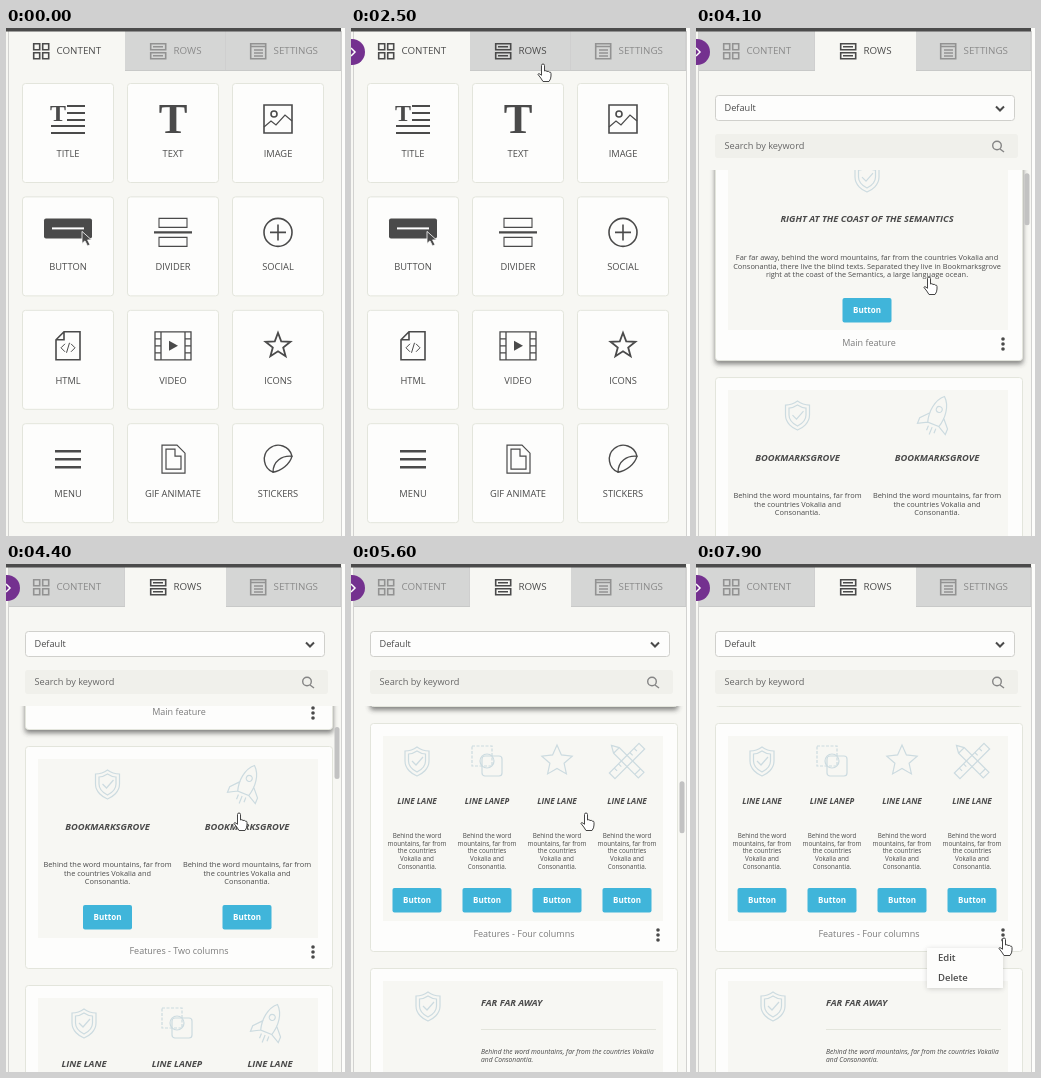
Write an HTML page that moves like this. It is 339 by 508 pixels and loops after 8000 ms.

```html
<!DOCTYPE html>
<html lang="en">
<head>
<meta charset="utf-8">
<title>Editor panel</title>
<style>
  html, body { margin: 0; width: 100%; height: 100%; overflow: hidden; background: #fdfdfb; }
  svg { display: block; width: 339px; height: 508px; font-family: "Open Sans", sans-serif; }
  .icon, .art { fill: none; stroke: #4a4a4a; stroke-width: 1.6; }
  .art { stroke: #ccdbe0; stroke-width: 1.2; }
  .serif { font: bold 24px "Liberation Serif", serif; fill: #4a4a4a; stroke: none; }
</style>
</head>
<body>
<svg id="stage" viewBox="0 0 339 508"></svg>
<script>
const LOOP = 8000, STEP = 100;
const INK = '#4a4a4a', PANEL = '#f7f7f3', CARD = '#fdfdfc', LINE = '#e3e5dc', TAB = '#d5d6d5', BLUE = '#40b5da';

const rect = (x, y, w, h, fill, extra = '') =>
  `<rect x="${x}" y="${y}" width="${w}" height="${h}" fill="${fill}" ${extra}/>`;
const path = (d, extra = '') => `<path d="${d}" ${extra}/>`;
const text = (x, y, str, size, extra = '', fill = INK) =>
  `<text x="${x}" y="${y + size * .36}" font-size="${size}" fill="${fill}" ${extra}>${str}</text>`;
const MID = 'text-anchor="middle"';
const group = (x, y, body, extra = '') => `<g transform="translate(${x} ${y})" ${extra}>${body}</g>`;
const box = (x, y, w, h) => `M${x} ${y}h${w}v${h}h${-w}z`;
const star = (outer, inner) => 'M' + Array.from({ length: 10 }, (_, i) => {
  const r = i % 2 ? inner : outer, a = i * Math.PI / 5;
  return `${(r * Math.sin(a)).toFixed(1)} ${(-r * Math.cos(a)).toFixed(1)}`;
}).join('L') + 'z';

// Content tab: icons are drawn around their centre
const tiles = [
  ['TITLE', '<text class="serif" x="-18" y="2">T</text>' +
    path('M-1-13H17M-1-6H17M-1 1H17M-17 7H17M-17 14H17', 'stroke-width="2"')],
  ['TEXT', `<text class="serif" style="font-size:43px" y="14" ${MID}>T</text>`],
  ['IMAGE', path(box(-14, -14, 28, 28)) + '<circle cx="-4" cy="-5" r="3"/>' +
    path('M-14 8L-7 2L-2 6L7-4L14 2', 'stroke-width="1.2"')],
  ['BUTTON', rect(-24, -14, 48, 20, INK, 'rx="2" stroke="none"') +
    path('M-16-4H16', 'stroke="#fff" stroke-width="2"') +
    path('M14-1V11L17 8.5L19.5 13.5L22 12.3L19.6 7.5H23.500z', `fill="${INK}" stroke="#fff" stroke-width=".8"`)],
  ['DIVIDER', path(box(-14, -14, 28, 9) + box(-14, 5, 28, 9), 'stroke-width="1.1"') +
    path('M-19 0H19', 'stroke-width="2.2"')],
  ['SOCIAL', '<circle r="14"/>' + path('M-8 0H8M0-8V8')],
  ['HTML', path('M-4-14H12V14H-12V-6zV-6H-12') +
    path('M-3-2L-7 2L-3 6M3-2L7 2L3 6M1.500-3L-1.500 7', 'stroke-width="1"')],
  ['VIDEO', path(box(-18, -14, 36, 28) + 'M-12-14V14M12-14V14M-18-7h6M-18 0h6M-18 7h6M12-7h6M12 0h6M12 7h6', 'stroke-width="1.3"') +
    path('M-4-5L5 0L-4 5z', `fill="${INK}" stroke="none"`)],
  ['ICONS', path(star(13, 5.5), 'stroke-width="1.8"')],
  ['MENU', path('M-13-8H13M-13 0H13M-13 8H13', 'stroke-width="2.6"')],
  ['GIF ANIMATE', path('M-11-14H4L12-6V14H-11z', 'stroke-width="1.2"') +
    path('M-7-10H2V-3H8V10H-7z', 'stroke-width="1.2"')],
  ['STICKERS', path('M-5 13A14 14 0 1 1 14-3C4-4-5 2-5 13C3 12 12 5 14-3', 'stroke-width="1.4"')],
];
const contentView = tiles.map(([name, icon], i) => {
  const x = 16.5 + i % 3 * 105, y = 55.5 + Math.floor(i / 3) * 113.4;
  return rect(x, y, 91, 99, CARD, `rx="3" stroke="${LINE}"`) +
    group(x + 45.5, y + 35.5, icon, 'class="icon"') +
    text(x + 45.5, y + 70, name, 9.3, MID);
}).join('');

// Rows tab
const art = {
  shield: path('M0-14C4-11 8-10 12-10V0C12 8 5 13 0 15C-5 13-12 8-12 0V-10C-8-10-4-11 0-14z') +
    path('M0-10C3-8 6-7 8.500-7V0C8.500 6 4 9 0 11C-4 9-8.500 6-8.500 0V-7C-6-7-3-8 0-10z') + path('M-5 0L-1 4L6-4'),
  shapes: path(box(-15, -15, 20, 20), 'stroke-dasharray="3 1.5"') +
    '<rect x="-5" y="-5" width="20" height="20" rx="3"/><circle r="7"/>',
  rocket: `<g transform="rotate(22)">${path('M0-20C8-13 9 0 6 10H-6C-9 0-8-13 0-20zM-7 0L-15 9V15L-6 10M7 0L15 9V15L6 10M-4 13V18M0 13V21M4 13V18')}<circle cy="-6" r="3"/></g>`,
  star: path(star(16, 7.5)),
  tools: `<g transform="rotate(45)">${path(box(-4, -21, 8, 42) + 'M-4-14h4M-4-8h4M-4 8h4M-4 14h4')}</g>` +
    `<g transform="rotate(-45)">${path('M-4-15L0-22L4-15V20H-4zM-4-15H4M-4 15H4')}</g>`,
};
const drawArt = (name, x, y) => group(x, y, art[name], 'class="art"');
const button = (x, y) => rect(x - 24.5, y, 49, 24.5, BLUE, 'rx="2"') +
  text(x, y + 12, 'Button', 8, `${MID} font-weight="700"`, '#fff');
const HEADING = 'font-weight="700" font-style="italic"';
const column = (x, spec, [icon, title]) =>
  drawArt(icon, x, 38) +
  text(x, spec.titleY, title, spec.titleSize || 9.3, `${MID} ${HEADING}`) +
  spec.lines.map((line, i) => text(x, spec.textY + i * spec.size * 1.2, line, spec.size, MID)).join('') +
  button(x, spec.buttonY);

const SHIELD = ['shield', 'LINE LANE'], SHAPES = ['shapes', 'LINE LANEP'];
const cards = [
  { top: 142, height: 222, label: 'Main feature', xs: [171], titleY: 80, textY: 118, size: 7.4, buttonY: 159,
    cols: [['shield', 'RIGHT AT THE COAST OF THE SEMANTICS']],
    lines: ['Far far away, behind the word mountains, far from the countries Vokalia and',
      'Consonantia, there live the blind texts. Separated they live in Bookmarksgrove',
      'right at the coast of the Semantics, a large language ocean.'] },
  { top: 380, height: 223, label: 'Features - Two columns', xs: [101.5, 241], titleY: 81, textY: 118, size: 7.4, buttonY: 159,
    cols: [['shield', 'BOOKMARKSGROVE'], ['rocket', 'BOOKMARKSGROVE']],
    lines: ['Behind the word mountains, far from', 'the countries Vokalia and', 'Consonantia.'] },
  { top: 619, height: 230, label: 'Features - Three columns', xs: [78, 171, 264], titleY: 79, textY: 116, size: 7.4, buttonY: 167,
    cols: [SHIELD, SHAPES, ['rocket', 'LINE LANE']],
    lines: ['Behind the word', 'mountains, far from the', 'countries Vokalia and', 'Consonantia.'] },
  { top: 865, height: 229, label: 'Features - Four columns', xs: [66, 136, 206, 276], titleY: 78, titleSize: 8.2, textY: 113, size: 6.3, buttonY: 165,
    cols: [SHIELD, SHAPES, ['star', 'LINE LANE'], ['tools', 'LINE LANE']],
    lines: ['Behind the word', 'mountains, far from', 'the countries', 'Vokalia and', 'Consonantia.'] },
  { top: 1110, height: 230, label: '', xs: [], cols: [] },
];
const articleBody = drawArt('shield', 77, 38) +
  text(130, 35, 'FAR FAR AWAY', 9.3, HEADING) + rect(130, 61, 175, 1, LINE) +
  ['Behind the word mountains, far from the countries Vokalia', 'and Consonantia.']
    .map((line, i) => text(130, 84 + i * 8, line, 6.7, 'font-style="italic"')).join('');

const cardView = card => group(0, card.top,
  rect(19, 3, 308, card.height, '#333', 'class="shadow" rx="3" filter="url(#blur)" opacity="0"') +
  rect(19.5, .5, 307, card.height - 1, CARD, `rx="3" stroke="${LINE}"`) +
  rect(32, 13, 280, card.height - 44, PANEL) +
  (card.xs.length ? card.xs.map((x, i) => column(x, card, card.cols[i])).join('') : articleBody) +
  text(173, card.height - 18, card.label, 9, MID, '#7b7b7b') +
  [-5, 0, 5].map(dy => `<circle cx="307" cy="${card.height - 17 + dy}" r="1.8" fill="${INK}"/>`).join(''));

const rowsView =
  `<g clip-path="url(#list)"><g id="scroller">${cards.map(cardView).join('')}</g></g>` +
  rect(19.5, 67.5, 299, 25, CARD, 'rx="3" stroke="#d0d0cc"') + text(28.5, 80, 'Default', 9.2) +
  path('M300 78.500L304 82.500L308 78.500', `fill="none" stroke="${INK}" stroke-width="2"`) +
  rect(19, 106, 303, 24, '#f0f0eb', 'rx="3"') + text(28.5, 118, 'Search by keyword', 9.2, '', '#666') +
  '<g fill="none" stroke="#858585" stroke-width="1.4"><circle cx="301" cy="117.500" r="4.300"/><path d="M304 121L308 124"/></g>' +
  rect(328.5, 142, 5, 52, '#c2c2c2', 'id="thumb" rx="2.5"');

// Tab strip
const tabs = [
  { x: 2, w: 117, label: 'CONTENT', icon: 27, d: box(.7, .7, 6, 6) + box(9.7, .7, 6, 6) + box(.7, 9.7, 6, 6) + box(9.7, 9.7, 6, 6) },
  { x: 119, w: 101, label: 'ROWS', icon: 144, d: box(.7, .7, 15, 6) + box(.7, 9.7, 15, 6) + 'M3 3.700H13M3 12.700H13' },
  { x: 220, w: 115, label: 'SETTINGS', icon: 244, d: box(.7, .7, 15, 15) + 'M1 3.500H15M4 7H13M4 10H13M4 13H13' },
];
const tabView = tab => `<g class="tab">` +
  rect(tab.x, 3, tab.w, 40, TAB) + path(`M${tab.x} 42.500h${tab.w}M${tab.x + tab.w} 3v40`, 'class="edge" stroke="#c8c9c8"') +
  group(tab.icon, 15, path(tab.d), 'class="icon"') +
  text(tab.icon + 23.5, 22.5, tab.label, 9.8) + '</g>';

const menuView = rect(231, 385, 76, 40, '#555', 'filter="url(#blur)" opacity=".25"') +
  rect(231, 384, 76, 40, CARD) +
  text(242, 394, 'Edit', 9.5, 'font-weight="600"') + text(242, 413.5, 'Delete', 9.5, 'font-weight="600"');

document.getElementById('stage').innerHTML =
  `<defs><filter id="blur" x="-10%" y="-20%" width="120%" height="140%"><feGaussianBlur stdDeviation="2.5"/></filter>
   <clipPath id="list"><rect x="2" y="142" width="333" height="366"/></clipPath></defs>` +
  rect(0, 0, 336, 508, PANEL) +
  `<g id="content">${contentView}</g><g id="rows">${rowsView}</g>` +
  tabs.map(tabView).join('') +
  path('M2.500 3V508M335.500 3V508', 'stroke="#d2d2d0"') + rect(0, 0, 335, 3.5, '#4b4b4b') +
  `<g id="opener"><circle cx="1" cy="24" r="13" fill="#74318f"/>${path('M0 20L4 24L0 28', 'fill="none" stroke="#fff" stroke-width="1.5"')}</g>` +
  `<g id="menu">${menuView}</g>` +
  `<g id="cursor">${path('M-1.500 1.500a1.500 1.500 0 0 1 3 0V7q1.500-1 2.500.5 1.500-.7 2.200.6 1.800-.4 1.800 1.400V12q0 3-2 5.500H0Q-2 14-5 10.500q.3-2 3.500.8z', 'fill="#fff" stroke="#444"')}</g>`;

// Motion
const $ = id => document.getElementById(id);
const clamp01 = v => Math.min(1, Math.max(0, v));
const smooth = v => v * v * (3 - 2 * v);
function track(keys, t) {
  const next = keys.findIndex(key => key[0] > t);
  if (next < 0) return keys[keys.length - 1].slice(1);
  if (next === 0) return keys[0].slice(1);
  const a = keys[next - 1], b = keys[next], p = smooth((t - a[0]) / (b[0] - a[0]));
  return a.slice(1).map((v, i) => v + (b[i + 1] - v) * p);
}
const scrollKeys = [[4000, 0], [4400, 198], [4700, 404], [5000, 404], [5600, 706]];
const cursorKeys = [[1000, 318, 300], [1800, 192, 36], [3200, 192, 36], [3600, 233, 249],
  [5200, 233, 249], [5600, 235, 249], [5900, 235, 249], [6600, 308, 374]];
const hoverTimes = { 0: [3500, 4400], 2: [4700, 5600], 3: [5700, 6900] };
const fade = (t, [start, end]) => clamp01((t - start) / 200) * (1 - clamp01((t - end) / 200));

const tabNodes = [...document.querySelectorAll('.tab')];
const shadowNodes = [...document.querySelectorAll('.shadow')];
const show = (id, on) => { $(id).style.display = on ? '' : 'none'; };

function draw(t) {
  const rowsOpen = t >= 2700, active = rowsOpen ? 1 : 0;
  show('content', !rowsOpen);
  show('rows', rowsOpen);
  show('opener', t >= 1000);
  show('cursor', t >= 1000);
  show('menu', t >= 7000);
  show('thumb', t >= 3600 && t < 7000);

  tabNodes.forEach((node, i) => {
    const dark = i === active || (i === 1 && t >= 1800);
    node.querySelector('rect').style.fill = i === active ? PANEL : TAB;
    node.querySelector('.edge').style.display = i === active ? 'none' : '';
    node.querySelector('.icon').style.stroke = dark ? INK : '#929292';
    node.querySelector('text').style.fill = dark ? INK : '#8a8a8a';
  });

  const [scroll] = track(scrollKeys, t);
  $('scroller').setAttribute('transform', `translate(0 ${-scroll})`);
  $('thumb').setAttribute('y', 142 + scroll * .1065);
  shadowNodes.forEach((node, i) =>
    node.setAttribute('opacity', hoverTimes[i] ? .6 * fade(t, hoverTimes[i]) : 0));
  $('cursor').setAttribute('transform', `translate(${track(cursorKeys, t)})`);
}

const startTime = performance.now();
function frame() {
  const t = (performance.now() - startTime) % LOOP;
  draw(Math.floor(t / STEP) * STEP);
  requestAnimationFrame(frame);
}
frame();
</script>
</body>
</html>
```
